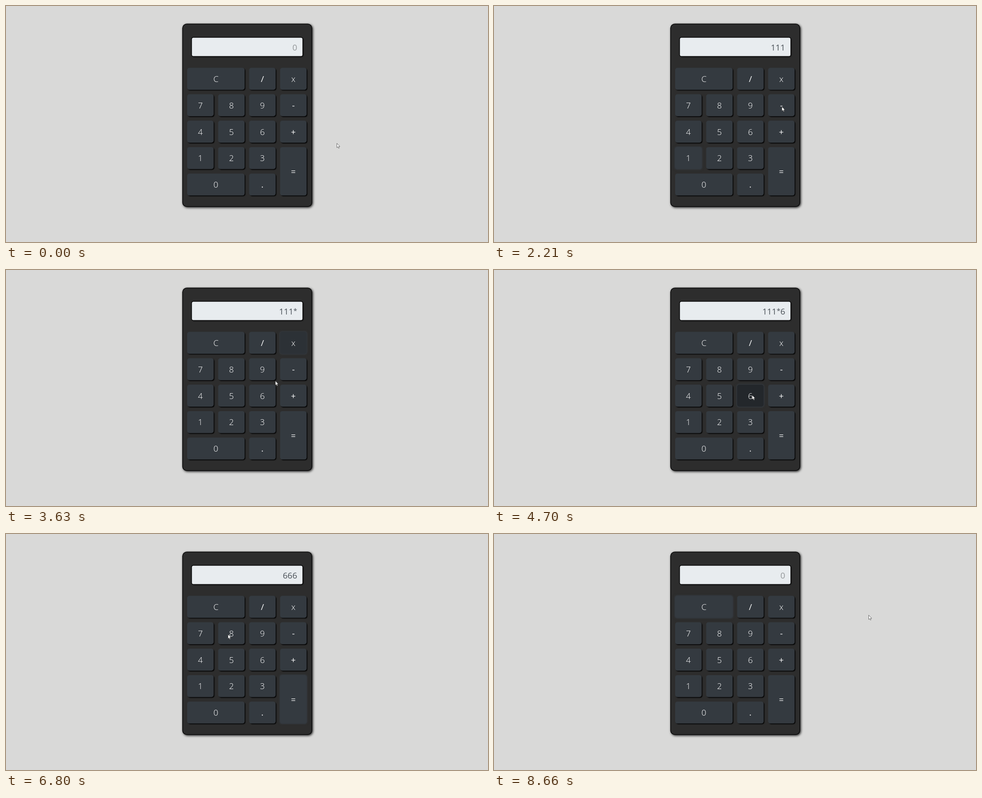
Animation of 1067 by 525 pixels, one loop 8.74 s. Source, as an HTML page with a canvas:

```html
<!DOCTYPE html>
<html lang="en">
<head>
<meta charset="utf-8">
<title>Calculator</title>
<style>
  html, body { margin: 0; width: 100%; height: 100%; overflow: hidden; background: #d9d9d8; }
  canvas { display: block; }
</style>
</head>
<body>
<canvas id="stage" width="1067" height="525"></canvas>
<script>
const ctx = document.getElementById('stage').getContext('2d');
const FONT = '"Open Sans", "Noto Sans", sans-serif';
const LOOP = 8740;
const TICK = 77.6;
const FIRST_TICK = 265;
const FADE = 2;

const BASE = [52, 58, 64], HOVER = [35, 39, 43], PRESSED = [29, 33, 36];

// A repeated character is one key spanning several cells.
const layout = ['CC/x', '789-', '456+', '123=', '00.='];
const PITCH_X = 68.6, PITCH_Y = 58.8, GAP = 9.9;

const keys = [...new Set(layout.join(''))].map(label => {
  const rows = layout.filter(row => row.includes(label));
  const col = rows[0].indexOf(label);
  const cols = rows[0].lastIndexOf(label) - col + 1;
  return {
    label,
    x: 401 + col * PITCH_X,
    y: 137.5 + layout.indexOf(rows[0]) * PITCH_Y,
    w: cols * PITCH_X - GAP,
    h: rows.length * PITCH_Y - GAP
  };
});

// Where the pointer travels, how far the way there bows out, and when it taps.
const home = { x: 732, y: 305 };
const visits = [
  { key: '1', leave: -1, arrive: 9, x: 426, y: 328, bow: -43, taps: [10, 14, 19] },
  { key: 'x', leave: 21, arrive: 28, x: 642, y: 161, bow: 99, taps: [36] },
  { key: '6', leave: 40, arrive: 47, x: 571, y: 278, bow: -6, taps: [49] },
  { key: '=', leave: 57, arrive: 66, x: 632, y: 368, bow: 0, taps: [70] },
  { key: 'C', leave: 79, arrive: 91, x: 429, y: 159, bow: 0, taps: [94] },
  { key: '', leave: 96, arrive: 108, x: 829, y: 180, bow: 0, taps: [] }
];

const clamp = v => Math.max(0, Math.min(1, v));
const easeOut = v => 1 - (1 - v) ** 2.2;
const mix = (a, b, k) => a.map((v, i) => v + (b[i] - v) * k);
const rgb = c => `rgb(${c.map(Math.round)})`;

function ramp(n, start, length = FADE) {
  const v = clamp((n - start) / length);
  return v * v * (3 - 2 * v);
}

function pointerAt(n) {
  const i = visits.findLastIndex(v => v.leave <= n);
  if (i < 0) return home;
  const from = visits[i - 1] || home, to = visits[i];
  const k = easeOut(clamp((n - to.leave) / (to.arrive - to.leave)));
  const dx = to.x - from.x, dy = to.y - from.y;
  const side = to.bow * Math.sin(Math.PI * k) / Math.hypot(dx, dy);
  return { x: from.x + dx * k - dy * side, y: from.y + dy * k + dx * side };
}

function keyState(label, n) {
  const i = visits.findIndex(v => v.key === label);
  if (i < 0) return { color: BASE, shadow: 1, ring: 0 };
  const { arrive, taps } = visits[i], next = visits[i + 1];
  const hover = ramp(n, arrive - 3) * (1 - ramp(n, next.leave + 2));
  const pressed = taps.some(tap => n >= tap && n < tap + FADE);
  const blur = next.taps.length ? ramp(n, next.taps[0]) : 0;
  return {
    color: pressed ? PRESSED : mix(BASE, HOVER, hover),
    shadow: Math.max(1 - ramp(n, taps[0], 1), blur),
    ring: ramp(n, taps[0] + 1) * (1 - blur)
  };
}

function displayText(n) {
  let text = '';
  for (const { key, taps } of visits) {
    for (const tap of taps) {
      if (tap > n) return text;
      if (key === 'C') text = '';
      else if (key === '=') text = String(text.split('*').reduce((a, b) => a * b));
      else text += key === 'x' ? '*' : key;
    }
  }
  return text;
}

function box(x, y, w, h, radius, color, shadow) {
  ctx.save();
  if (shadow) {
    ctx.shadowColor = shadow.color;
    ctx.shadowBlur = shadow.blur;
    ctx.shadowOffsetX = ctx.shadowOffsetY = shadow.offset;
  }
  ctx.fillStyle = color;
  ctx.beginPath();
  ctx.roundRect(x, y, w, h, radius);
  ctx.fill();
  ctx.restore();
}

function drawKey({ label, x, y, w, h }, n) {
  const { color, shadow, ring } = keyState(label, n);
  if (ring > 0) {
    box(x - 1.5, y - 1.5, w + 3, h + 3, 6, `rgba(52,58,64,${0.55 * ring})`,
      { color: `rgba(52,58,64,${ring})`, blur: 4, offset: 0 });
  }
  box(x, y, w, h, 5, rgb(color), { color: `rgba(0,0,0,${0.9 * shadow})`, blur: 1.5, offset: 1.7 });

  const weight = /\w/.test(label) ? 350 : 400;
  ctx.font = `${weight} 18.5px ${FONT}`;
  ctx.textAlign = 'center';
  ctx.fillStyle = '#fff';
  ctx.fillText(label, x + w / 2, y + h / 2 + 7);
}

function drawDisplay(n) {
  box(410, 69, 247.5, 43.5, 5, '#000', { color: 'rgba(0,0,0,.7)', blur: 2, offset: 1.2 });
  box(411.5, 70.5, 244.8, 41, 3.5, '#e8ecef');

  const text = displayText(n);
  ctx.fillStyle = text ? '#495057' : '#939698';
  ctx.textAlign = 'right';
  let right = 644.5;
  for (const char of [...(text || '0')].reverse()) {
    const star = char === '*';
    ctx.font = `400 ${star ? 15 : 18.5}px ${FONT}`;
    ctx.fillText(char, right, star ? 96 : 99);
    right -= ctx.measureText(char).width;
  }
}

function drawPointer(n) {
  const { x, y } = pointerAt(n);
  ctx.save();
  ctx.translate(x + 0.5, y + 0.5);
  ctx.fillStyle = '#fff';
  ctx.strokeStyle = '#333';
  ctx.lineWidth = 0.7;
  const arrow = new Path2D('M0 0V9.6L2.1 7.7 3.6 11 5.2 10.3 3.8 7.1 6.6 7Z');
  ctx.fill(arrow);
  ctx.stroke(arrow);
  ctx.restore();
}

function draw(time) {
  const n = Math.floor((time % LOOP - FIRST_TICK) / TICK);
  box(0, 0, 1067, 525, 0, '#d9d9d8');
  box(390.2, 39.2, 287.6, 407.8, 10, '#0a0a0a', { color: 'rgba(0,0,0,.85)', blur: 5, offset: 1.7 });
  box(391.8, 40.8, 284.4, 404.6, 8.5, '#2d2d2d');
  drawDisplay(n);
  keys.forEach(key => drawKey(key, n));
  drawPointer(n);
}

const start = performance.now();
function frame() {
  draw(performance.now() - start);
  requestAnimationFrame(frame);
}
frame();
</script>
</body>
</html>
```
